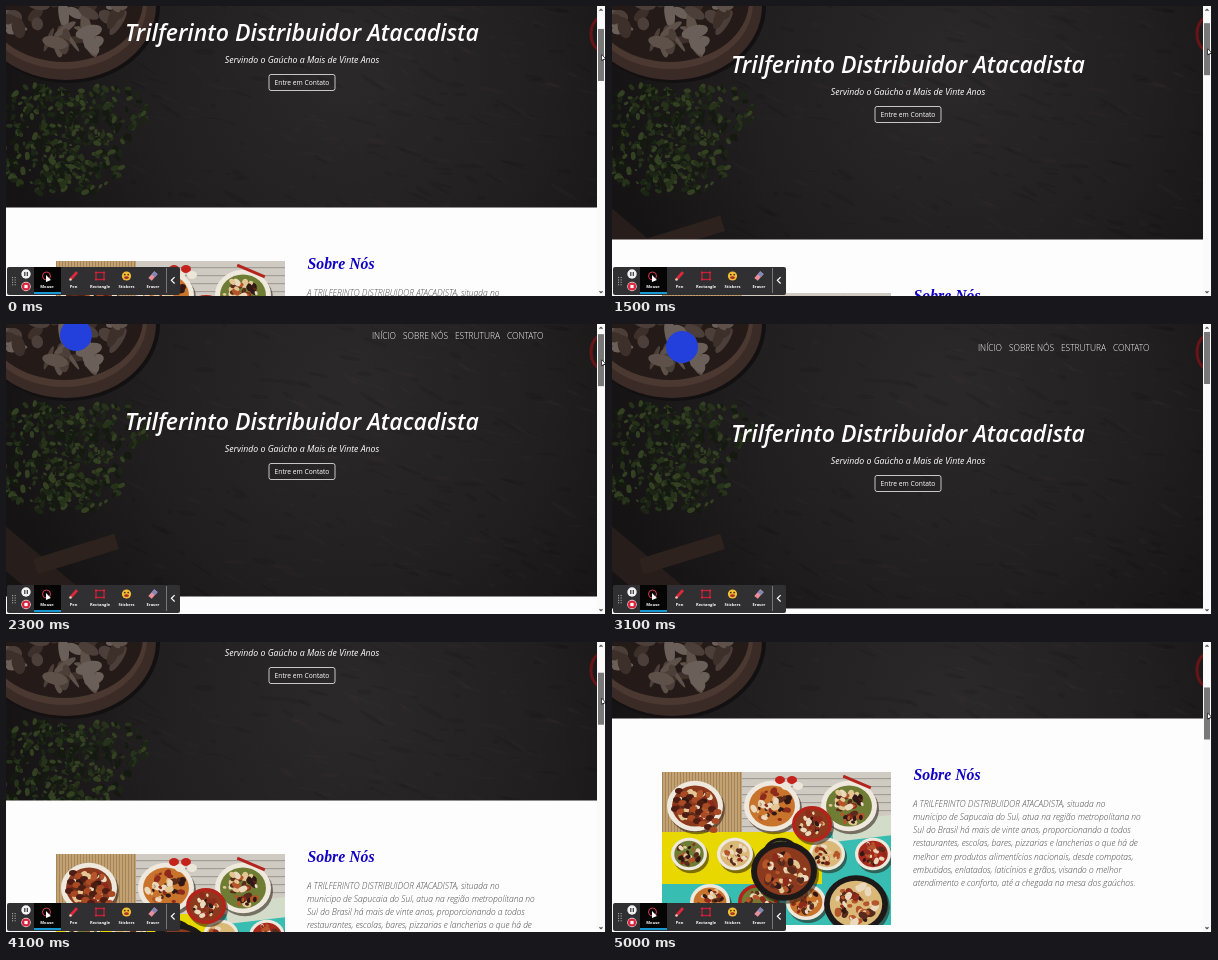
An HTML page with a canvas for the animation above (5100 ms loop, 600x290 px).

```html
<!DOCTYPE html>
<html lang="pt-BR">
<head>
<meta charset="utf-8">
<title>Trilferinto</title>
<style>
html, body { margin: 0; width: 100%; height: 100%; overflow: hidden; background: #fff; }
canvas { display: block; width: 600px; height: 290px; }
</style>
</head>
<body>
<canvas id="stage" width="600" height="290"></canvas>
<script>
const W = 600, H = 290, PAGE_W = 591, LOOP = 5100, STEP = 100;
const SANS = '"Open Sans", "Noto Sans", sans-serif';
const SERIF = '"Liberation Serif", "Noto Serif", serif';
const ctx = document.getElementById('stage').getContext('2d');

// Each drag of the scrollbar: start, end, bottom edge of the hero afterwards.
const FIRST = 202, REST = 285;
const drags = [
  [0, 600, 197], [1100, 1600, 243], [1700, 1800, 261], [2000, 2600, REST],
  [3100, 3700, 204], [3800, 4500, 99], [4500, 5000, 77]
];

const paragraph = [
  'A TRILFERINTO DISTRIBUIDOR ATACADISTA, situada no',
  'municipo de Sapucaia do Sul, atua na região metropolitana no',
  'Sul do Brasil há mais de vinte anos, proporcionando a todos',
  'restaurantes, escolas, bares, pizzarias e lancherias o que há de',
  'melhor em produtos alimentícios nacionais, desde compotas,',
  'embutidos, enlatados, laticínios e grãos, visando o melhor',
  'atendimento e conforto, até a chegada na mesa dos gaúchos.'
];

function heroBottom(t) {
  let y = FIRST;
  for (const [start, end, goal] of drags) {
    const k = Math.min(1, Math.max(0, (t - start) / (end - start)));
    y += (goal - y) * k;
  }
  return Math.round(y);
}

function seeded(seed) {
  return () => (seed = (seed * 16807) % 2147483647) / 2147483647;
}

function layer(w, h, paint) {
  const c = document.createElement('canvas');
  c.width = w;
  c.height = h;
  paint(c.getContext('2d'));
  return c;
}

function rect(g, x, y, w, h, fill) {
  g.fillStyle = fill;
  g.fillRect(x, y, w, h);
}

function oval(g, x, y, rx, ry, fill, turn = 0) {
  g.beginPath();
  g.ellipse(x, y, rx, ry, turn, 0, Math.PI * 2);
  g.fillStyle = fill;
  g.fill();
}

function ring(g, x, y, rx, ry, color, width) {
  g.beginPath();
  g.ellipse(x, y, rx, ry, 0, 0, Math.PI * 2);
  g.strokeStyle = color;
  g.lineWidth = width;
  g.stroke();
}

// Bar centred on a point and turned about it.
function bar(g, x, y, w, h, turn, fill) {
  g.save();
  g.translate(x, y);
  g.rotate(turn);
  rect(g, -w / 2, -h / 2, w, h, fill);
  g.restore();
}

function pointer(x, y, size, fill) {
  ctx.beginPath();
  ctx.moveTo(x, y);
  ctx.lineTo(x, y + size);
  ctx.lineTo(x + size * 0.7, y + size * 0.7);
  ctx.fillStyle = fill;
  ctx.fill();
}

function chevron(x, y, size, turn, color) {
  ctx.save();
  ctx.translate(x, y);
  ctx.rotate(turn);
  ctx.beginPath();
  ctx.moveTo(-size, size / 2);
  ctx.lineTo(0, -size / 2);
  ctx.lineTo(size, size / 2);
  ctx.strokeStyle = color;
  ctx.lineWidth = 1.2;
  ctx.stroke();
  ctx.restore();
}

function text(str, x, y, font, fill, align = 'left') {
  ctx.font = font;
  ctx.textAlign = align;
  ctx.fillStyle = fill;
  ctx.fillText(str, x, y);
}

function paintBasket(g, rnd) {
  oval(g, 62, 0, 92, 77, '#121011');
  oval(g, 60, 0, 90, 74, '#3a2b26');
  oval(g, 58, -3, 83, 66, '#4a3831');
  oval(g, 58, -5, 79, 61, '#241b19');
  const skins = ['#3d2f2a', '#4c3f39', '#5d514a', '#6b6059'];
  for (let i = 0; i < 70; i++) {
    const a = rnd() * Math.PI * 2, d = Math.sqrt(rnd()) * 0.84;
    oval(g, 58 + Math.cos(a) * d * 76, -5 + Math.sin(a) * d * 58,
      6 + rnd() * 9, 2 + rnd() * 5, skins[i % 4], rnd() * Math.PI);
  }
}

function paintHerbs(g, rnd) {
  const greens = ['#141a10', '#1c2515', '#26321a', '#334122'];
  // Four sprigs, left and right of each row.
  for (let sprig = 0; sprig < 4; sprig++) {
    const row = sprig >> 1;
    const cx = 35 + (sprig % 2) * (66 - row * 24), cy = 108 + row * 48;
    for (let i = 0; i < 130; i++) {
      const a = rnd() * Math.PI * 2, d = Math.sqrt(rnd()), size = 1.5 + rnd() * 3;
      oval(g, cx + Math.cos(a) * d * 40, cy + Math.sin(a) * d * 31,
        size, size * 0.6, greens[Math.floor(rnd() * 4)], rnd() * 3);
    }
  }
}

const backdrop = layer(PAGE_W, H, g => {
  const rnd = seeded(71);
  const glow = g.createRadialGradient(340, 60, 20, 340, 80, 340);
  glow.addColorStop(0, '#2b2829');
  glow.addColorStop(0.55, '#221f20');
  glow.addColorStop(1, '#151314');
  rect(g, 0, 0, PAGE_W, H, glow);
  for (let i = 0; i < 300; i++) {
    const shade = i % 2 ? 'rgba(0,0,0,.08)' : 'rgba(130,115,110,.035)';
    oval(g, 120 + rnd() * 472, rnd() * H, 2 + rnd() * 14, 0.6 + rnd() * 2, shade, rnd() * 0.6);
  }
  paintBasket(g, rnd);
  paintHerbs(g, rnd);
  bar(g, 30, 250, 120, 34, 0.7, '#271e1b');
  bar(g, 70, 230, 85, 16, -0.3, '#2d221e');
  ring(g, 595, 28, 10, 16, '#651518', 3);
});

const meal = layer(229, 153, g => {
  const rnd = seeded(19);
  const pick = list => list[Math.floor(rnd() * list.length)];
  const foods = ['#8c3a1e', '#d9b878', '#4a2219', '#c9742c', '#6f7c34', '#a8281c'];
  const bits = ['#5a2a1b', '#e3c693', '#311815', '#b4562a', '#ead9bd', '#8d2a1c'];

  rect(g, 0, 0, 229, 153, '#cfcbc3');
  for (let y = 6; y < 60; y += 8) rect(g, 80, y, 149, 1.2, '#a39d97');
  rect(g, 0, 0, 80, 60, '#c2a173');
  for (let x = 0; x < 80; x += 3) rect(g, x, 0, 1, 60, '#a58459');
  rect(g, 0, 60, 229, 93, '#37bdb2');
  rect(g, 0, 60, 160, 52, '#e8d800');
  bar(g, 205, 56, 70, 20, -0.12, '#d3dcc8');

  const dish = (x, y, r, rim) => {
    const food = pick(foods);
    oval(g, x + 2, y + 3, r, r * 0.9, 'rgba(40,25,15,.55)');
    oval(g, x, y, r, r * 0.9, rim);
    oval(g, x, y, r * 0.82, r * 0.73, food);
    for (let i = 0; i < r * 1.5; i++) {
      const a = rnd() * Math.PI * 2, d = Math.sqrt(rnd()) * 0.66 * r;
      const size = 1.5 + rnd() * r * 0.12;
      oval(g, x + Math.cos(a) * d, y + Math.sin(a) * d * 0.9, size, size * 0.7, pick(bits), rnd() * 3);
    }
  };
  const dishRow = (count, x, gap, y, r, rims) => {
    for (let i = 0; i < count; i++) dish(x + i * gap, y, r, rims[i % rims.length]);
  };
  const china = '#eee8dd', iron = '#1d1919', red = '#b3231a';
  dishRow(3, 33, 77, 34, 28, [china]);
  dishRow(5, 27, 46, 82, 18, [china, china, iron]);
  dishRow(4, 48, 48, 130, 20, [china, red]);
  dish(150, 52, 20, red);
  dish(122, 99, 33, iron);
  dish(194, 132, 32, iron);

  // skewers
  for (let i = 0; i < 3; i++) {
    for (let k = 0; k < 8; k++)
      oval(g, 13 + k * 5.5 + i * 2, 37 - i * 9 + k * 3, 4, 3, k % 2 ? '#a94a24' : '#4d1d13');
  }
  // garlic and peppers
  for (let i = 0; i < 4; i++)
    oval(g, 118 + i * 6, 8 + (i % 2) * 6, 5, 4, i % 2 ? '#eee5d9' : '#c5221b');
  bar(g, 195, 10, 30, 3, 0.4, '#b3241f');
});

function drawHero(bottom) {
  ctx.save();
  ctx.beginPath();
  ctx.rect(0, 0, PAGE_W, bottom - 0.5);
  ctx.clip();
  ctx.drawImage(backdrop, 0, 0);

  oval(ctx, 70, bottom - 262, 16, 16, '#2340dc');
  let x = 366;
  for (const label of ['INÍCIO', 'SOBRE NÓS', 'ESTRUTURA', 'CONTATO']) {
    text(label, x, bottom - 258, `300 8.4px ${SANS}`, '#fff');
    x += ctx.measureText(label).width + 7;
  }
  text('Trilferinto Distribuidor Atacadista', 296, bottom - 167.5, `italic 600 23.1px ${SANS}`, '#fff', 'center');
  text('Servindo o Gaúcho a Mais de Vinte Anos', 296, bottom - 145, `italic 8.75px ${SANS}`, '#fff', 'center');
  ctx.beginPath();
  ctx.roundRect(263, bottom - 133.5, 66, 16, 2);
  ctx.strokeStyle = '#d8d8d8';
  ctx.lineWidth = 0.9;
  ctx.stroke();
  text('Entre em Contato', 296, bottom - 123, `6.7px ${SANS}`, '#fff', 'center');
  ctx.restore();
}

function drawAbout(top) {
  ctx.drawImage(meal, 50, top + 53);
  text('Sobre Nós', 301.5, top + 61, `italic bold 15.8px ${SERIF}`, '#1000c4');
  paragraph.forEach((line, i) =>
    text(line, 301, top + 87.5 + i * 13.25, `italic 300 8.53px ${SANS}`, '#4a4a4a'));
}

function drawScrollbar(bottom) {
  const top = 8 + (REST - bottom) / 5.55;
  rect(ctx, PAGE_W, 0, W - PAGE_W, H, '#fafafa');
  rect(ctx, PAGE_W + 1, top, 6, 52, '#787878');
  chevron(595, 4, 1.5, 0, '#505050');
  chevron(595, 286, 1.5, Math.PI, '#505050');
  rect(ctx, W - 1, 0, 1, H, '#1c1c1c');
  if (bottom < REST) {
    pointer(595.5, top + 25, 7, '#111');
    pointer(596, top + 26.3, 4.5, '#fff');
  }
}

// Icons are drawn around the centre of their button.
const tools = {
  Mouse() {
    ring(ctx, -0.5, 0, 4, 4, '#d83b50', 1);
    pointer(-1, -1, 7, '#fff');
  },
  Pen() {
    bar(ctx, 0.5, -0.5, 9, 3, -0.85, '#e0283c');
    oval(ctx, -3, 3.5, 1.3, 1.3, '#f3c9b5');
  },
  Rectangle() {
    ctx.strokeStyle = '#c51f35';
    ctx.lineWidth = 1.3;
    ctx.strokeRect(-4, -3.5, 8, 7);
    for (const x of [-4, 4]) for (const y of [-3.5, 3.5]) oval(ctx, x, y, 1.1, 1.1, '#d9263b');
  },
  Stickers() {
    oval(ctx, 0, 0, 4.6, 4.6, '#f5bf35');
    for (const x of [-1.7, 1.7]) oval(ctx, x, -1.4, 0.9, 0.9, '#4a3210');
    oval(ctx, 0, 1.7, 2.4, 1.4, '#a4332b');
  },
  Eraser() {
    bar(ctx, 0, 0, 9, 4.5, -0.85, '#e88f9b');
    bar(ctx, 1.6, -1.8, 4, 4.5, -0.85, '#7e87b5');
  }
};

function drawToolbar() {
  ctx.beginPath();
  ctx.roundRect(1, 261, 173, 28, 2);
  ctx.fillStyle = '#303033';
  ctx.fill();
  for (let i = 0; i < 8; i++) rect(ctx, 6 + (i % 2) * 2.6, 271 + (i >> 1) * 2.4, 1.1, 1.1, '#a5a5a5');

  for (const y of [268, 280.5]) oval(ctx, 20, y, 4.7, 4.7, '#f2f2f2');
  for (const x of [18.2, 20.7]) rect(ctx, x, 266, 1.2, 4, '#333');
  oval(ctx, 20, 280.5, 4.1, 4.1, '#d9233c');
  bar(ctx, 20, 280.5, 3.2, 3.2, 0, '#fff');

  rect(ctx, 28, 261, 27, 27, '#050506');
  rect(ctx, 28, 286, 27, 2, '#1798d2');
  Object.entries(tools).forEach(([label, icon], i) => {
    const x = 41 + i * 26.5;
    ctx.save();
    ctx.translate(x, 270);
    icon();
    ctx.restore();
    text(label, x, 282, `bold 4.1px ${SANS}`, '#fff', 'center');
  });
  rect(ctx, 160, 262, 0.8, 25, '#8a8a8a');
  chevron(167, 274.3, 3.2, -Math.PI / 2, '#fff');
}

function draw(now) {
  const t = Math.floor((now % LOOP) / STEP) * STEP;
  const bottom = heroBottom(t);
  rect(ctx, 0, 0, W, H, '#fefdfe');
  drawHero(bottom);
  drawAbout(bottom);
  drawScrollbar(bottom);
  drawToolbar();
}

let start;
function tick(now) {
  start ??= now;
  draw(now - start);
  requestAnimationFrame(tick);
}
draw(0);
requestAnimationFrame(tick);
</script>
</body>
</html>
```
